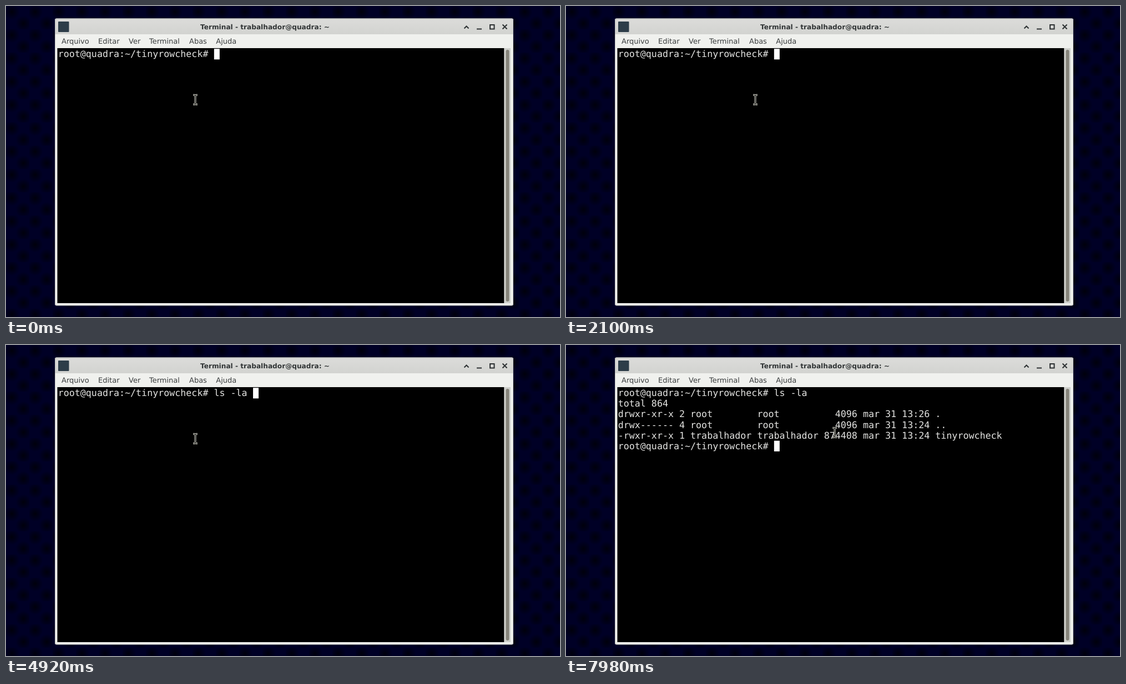
An HTML page for the animation above (8000 ms loop, 998 by 561 pixels).

```html
<!DOCTYPE html>
<html lang="pt">
<head>
<meta charset="utf-8">
<title>Terminal</title>
<style>
  html, body { margin: 0; width: 100%; height: 100%; overflow: hidden; background: #00001c; }
  svg { display: block; width: 998px; height: 561px; }
  text { white-space: pre; text-rendering: geometricPrecision; }
  .title { font: bold 12.15px "DejaVu Sans", sans-serif; fill: #303435; text-anchor: middle; }
  .menu { font: 13px "DejaVu Sans", sans-serif; fill: #3a3d3e; }
  .shell { font: 16.66px "DejaVu Sans Mono", monospace; fill: #e4e4e2; }
  .buttons { fill: none; stroke: #2c3032; stroke-width: 2; }
</style>
</head>
<body>
<svg viewBox="0 0 998 561">
  <defs>
    <radialGradient id="shade">
      <stop offset="0" stop-color="#00000c"/>
      <stop offset="1" stop-color="#00000c" stop-opacity="0"/>
    </radialGradient>
    <pattern id="wall" width="42" height="42" patternUnits="userSpaceOnUse">
      <rect width="42" height="42" fill="#000026"/>
      <circle cx="10.5" cy="10.5" r="14" fill="url(#shade)"/>
      <circle cx="31.5" cy="31.5" r="14" fill="url(#shade)"/>
    </pattern>
    <linearGradient id="bar" x2="0" y2="1">
      <stop offset="0" stop-color="#dcdcda"/>
      <stop offset="1" stop-color="#d2d3d0"/>
    </linearGradient>
  </defs>

  <rect width="998" height="561" fill="url(#wall)"/>
  <rect x="88" y="22.5" width="826" height="518" rx="3" fill="#f0f1ee"/>
  <path d="M88 51V25.5a3 3 0 0 1 3-3H911a3 3 0 0 1 3 3V51Z" fill="url(#bar)"/>
  <rect x="88.5" y="23" width="825" height="517" rx="3" fill="none" stroke="#9c9d9c" stroke-opacity=".6"/>
  <rect x="94" y="28" width="19.5" height="19" rx="1" fill="#2d3d49"/>
  <text class="title" x="466.5" y="42">Terminal - trabalhador@quadra: ~</text>
  <g class="buttons">
    <path d="M825.5 40.5l4-4 4 4M848 41.5h9M894.5 33.5l8 8m0-8l-8 8"/>
    <rect x="872" y="34" width="7.5" height="7.5"/>
  </g>
  <g class="menu" id="menu"></g>

  <rect x="92.5" y="76" width="805" height="460" fill="#000"/>
  <rect x="897.5" y="76" width="11.5" height="460" fill="#cfd0cc"/>
  <rect x="900.5" y="79" width="6" height="454" rx="3" fill="#85837a"/>
  <g class="shell" id="shell"></g>
  <rect id="caret" width="10" height="19.2" fill="#fff"/>
  <g id="pointer" fill="none">
    <path d="M-4-8.5h2.5L0-7.5l1.5-1H4M0-7.5v15M-4 8.5h2.5L0 7.5l1.5 1H4" stroke="#e8e8dc" stroke-width="3"/>
    <path d="M-4-8.5h2.5L0-7.5l1.5-1H4M0-7.5v15M-4 8.5h2.5L0 7.5l1.5 1H4" stroke="#000" stroke-width="1.2"/>
  </g>
</svg>
<script>
  const LOOP = 8000;
  const LEFT = 93.7, TOP = 77.2, COLUMN = 10.03, ROW = 19.1;
  const PROMPT = 'root@quadra:~/tinyrowcheck# ';
  const COMMAND = 'ls -la ';
  const KEY_TIMES = [2300, 2440, 2600, 2740, 2980, 3120, 3380];
  const ENTER = 5100;
  const LISTING = [
    'total 864',
    'drwxr-xr-x 2 root        root          4096 mar 31 13:26 .',
    'drwx------ 4 root        root          4096 mar 31 13:24 ..',
    '-rwxr-xr-x 1 trabalhador trabalhador 874408 mar 31 13:24 tinyrowcheck'
  ];
  const MOVE = { start: 7000, end: 7980, from: [341, 169], to: [484, 158] };
  const MENU = [['Arquivo', 100], ['Editar', 166], ['Ver', 221], ['Terminal', 258], ['Abas', 330], ['Ajuda', 378.3]];

  const byId = id => document.getElementById(id);
  const shell = byId('shell'), caret = byId('caret'), pointer = byId('pointer');

  function addText(parent, x, y, content = '') {
    const node = document.createElementNS('http://www.w3.org/2000/svg', 'text');
    node.setAttribute('x', x);
    node.setAttribute('y', y);
    node.textContent = content;
    parent.append(node);
    return node;
  }

  function place(node, x, y) {
    node.setAttribute('transform', `translate(${x} ${y})`);
  }

  MENU.forEach(([label, x]) => addText(byId('menu'), x, 68, label));
  const rows = Array.from({ length: LISTING.length + 2 },
    (_, i) => addText(shell, LEFT, TOP + 15 + i * ROW));

  function linesAt(time) {
    const typed = KEY_TIMES.filter(t => t <= time).length;
    const first = PROMPT + COMMAND.slice(0, typed);
    return time < ENTER ? [first] : [first, ...LISTING, PROMPT];
  }

  function draw(time) {
    const lines = linesAt(time);
    rows.forEach((row, i) => {
      const line = lines[i] || '';
      if (row.textContent !== line) row.textContent = line;
    });
    const last = lines.length - 1;
    place(caret, LEFT + lines[last].length * COLUMN + 0.3, TOP + last * ROW);

    const p = Math.min(1, Math.max(0, (time - MOVE.start) / (MOVE.end - MOVE.start)));
    const eased = p * p * (3 - 2 * p);
    place(pointer, ...MOVE.from.map((v, i) => v + (MOVE.to[i] - v) * eased));
  }

  const begin = performance.now();
  function tick() {
    draw((performance.now() - begin) % LOOP);
    requestAnimationFrame(tick);
  }
  draw(0);
  requestAnimationFrame(tick);
</script>
</body>
</html>
```
